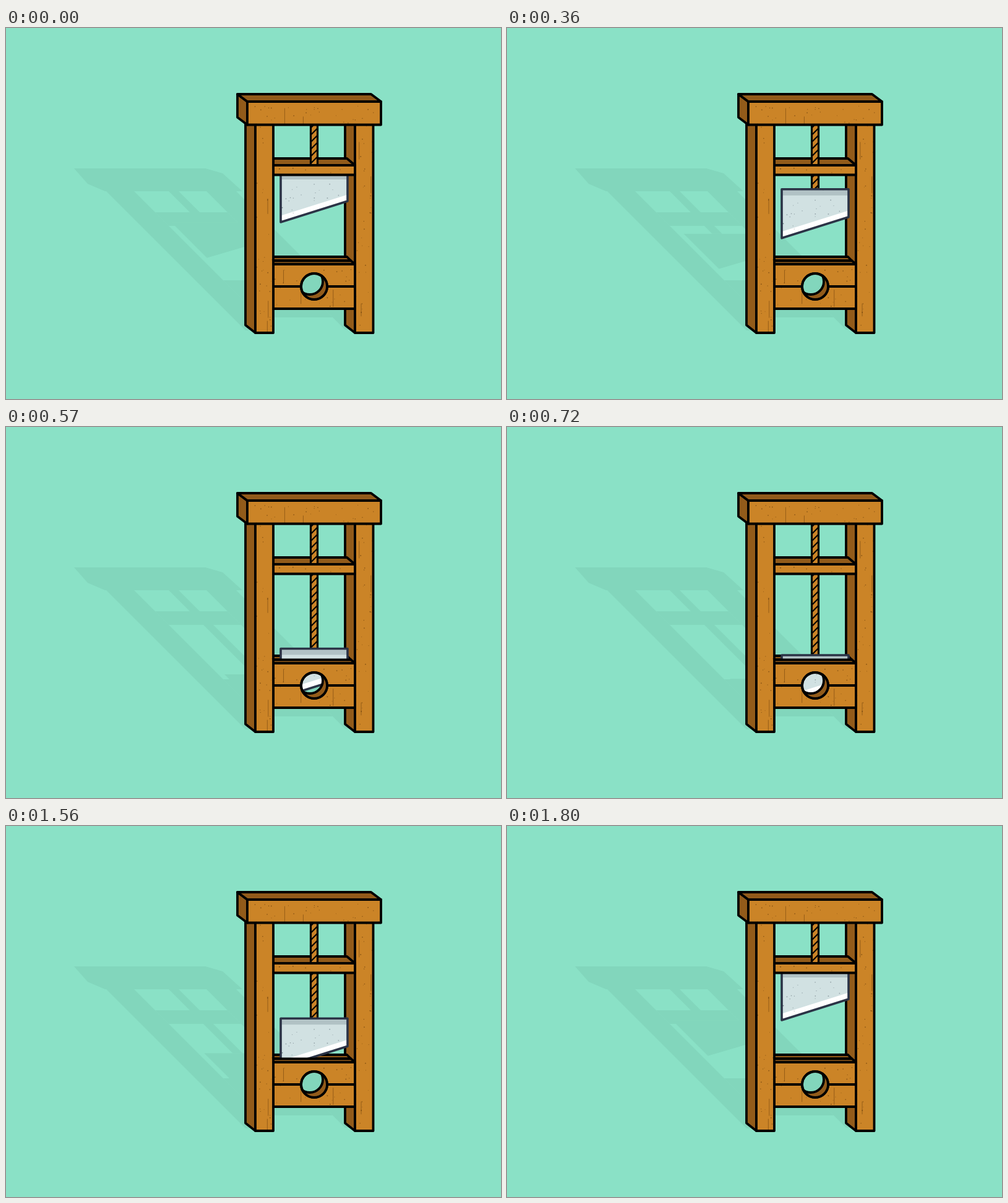
An HTML page with a canvas for the animation above (2730 ms loop, 800x600 px).

```html
<!DOCTYPE html>
<html lang="en">
<head>
<meta charset="utf-8">
<title>Falling blade</title>
<style>
html, body { margin: 0; width: 100%; height: 100%; overflow: hidden; background: #8ae1c6; }
canvas { display: block; }
</style>
</head>
<body>
<canvas id="stage" width="800" height="600"></canvas>
<script>
const ctx = document.getElementById('stage').getContext('2d');
const LOOP = 2730, STEP = 30;
const TOP = 235, DROP = 134;
const BG = '#8ae1c6', SHADE = '#82d6bc', INK = '#000';
const WOOD = '#cb8427', DARK = '#925b1a', GRAIN = 'rgba(70,38,5,.5)';
const STEEL = '#d1e1e2', BAND = '#b1c2c5', EDGE = '#2b3346';
const LINE = 3.8;

let seed;
function rand() {
  seed = (seed * 16807) % 2147483647;
  return seed / 2147483647;
}

// Cubic easing through (x1,y1) and (x2,y2)
function ease(p, x1, y1, x2, y2) {
  if (p <= 0) return 0;
  if (p >= 1) return 1;
  const at = (s, a, b) => 3 * s * (1 - s) * (1 - s) * a + 3 * s * s * (1 - s) * b + s * s * s;
  let lo = 0, hi = 1;
  for (let i = 0; i < 24; i++) {
    const mid = (lo + hi) / 2;
    if (at(mid, x1, x2) < p) lo = mid; else hi = mid;
  }
  return at(lo, y1, y2);
}

function bladeTop(t) {
  const fall = ease((t - 240) / 480, 0.425, 0, 0.25, 1);
  const rise = ease((t - 1350) / 450, 0.17, 0, 0.8, 0.885);
  return TOP + DROP * (fall - rise);
}

function shape(pts) {
  const path = new Path2D();
  for (let i = 0; i < pts.length; i += 2) path.lineTo(pts[i], pts[i + 1]);
  path.closePath();
  return path;
}

function circle(x, y, r) {
  const path = new Path2D();
  path.arc(x, y, r, 0, Math.PI * 2);
  return path;
}

function paint(path, fill, stroke, width = LINE) {
  ctx.fillStyle = fill;
  ctx.fill(path, 'evenodd');
  if (!stroke) return;
  ctx.strokeStyle = stroke;
  ctx.lineWidth = width;
  ctx.stroke(path);
}

function line(x1, y1, x2, y2, width = LINE, color = INK) {
  ctx.strokeStyle = color;
  ctx.lineWidth = width;
  ctx.beginPath();
  ctx.moveTo(x1, y1);
  ctx.lineTo(x2, y2);
  ctx.stroke();
}

function within(path, drawInside) {
  ctx.save();
  ctx.clip(path, 'evenodd');
  drawInside();
  ctx.restore();
}

function specks(x, y, w, h, color) {
  ctx.fillStyle = color;
  for (let n = w * h / 280; n > 0; n--) {
    const size = 0.7 + rand() * 0.9;
    ctx.fillRect(x + rand() * w, y + rand() * h, size, size);
  }
}

function cracks(x, y, w, h) {
  for (let n = Math.floor(w * h / 2500); n > 0; n--) {
    const cx = x + w * rand(), cy = y + h * rand();
    line(cx, cy, cx, cy + 12 + 20 * rand(), 0.8, GRAIN);
  }
}

// Timber with its front face at l,t,r,b and its depth going up and left
function timber(l, t, r, b, dx, dy, hole) {
  paint(shape([l, t, l - dx, t - dy, l - dx, b - dy, l, b]), DARK, INK);
  paint(shape([l, t, l - dx, t - dy, r - dx, t - dy, r, t]), DARK, INK);
  const face = shape([l, t, r, t, r, b, l, b]);
  if (hole) face.addPath(hole);
  paint(face, WOOD);
  within(face, () => {
    specks(l, t, r - l, b - t, GRAIN);
    cracks(l, t, r - l, b - t);
  });
  ctx.strokeStyle = INK;
  ctx.lineWidth = LINE;
  ctx.stroke(face);
}

const bladeShape = (x, y, k = 1) =>
  shape([x, y, x + 108, y, x + 108, y + 45 * k, x, y + 79 * k]);

function drawShadow(top) {
  paint(shape([110, 227, 322, 227, 350, 235, 382, 264, 160, 264, 132, 252]), SHADE);
  const y = 339 + 0.69 * (top - 270);
  const bar = (l, t, r, b) => ctx.fillRect(l, t, r - l, b - t);
  ctx.save();
  ctx.transform(1, 0, 1, 1, 0, 0);
  bar(-102, 262, -57, 489);
  bar(60, 262, 108, 488);
  bar(-57, 298, 60, 320);
  bar(-57, 408, 60, 468);
  bar(-1, 264, 15, y);
  paint(bladeShape(-47, y, 0.72), SHADE);
  ctx.restore();
}

function drawRope(bottom) {
  const rope = shape([492, 150, 504, 150, 504, bottom, 492, bottom]);
  paint(rope, WOOD);
  within(rope, () => {
    for (let y = 156; y < bottom + 6; y += 11.5) line(492, y + 6, 504, y - 6, 2.2);
  });
  for (const x of [492.5, 503.5]) line(x, 150, x, bottom, 3.2);
}

function drawBlade(y) {
  const blade = bladeShape(444, y);
  paint(blade, '#fff');
  within(blade, () => {
    paint(bladeShape(444, y - 10.5), STEEL);
    ctx.fillStyle = BAND;
    ctx.fillRect(444, y, 108, 10);
    specks(444, y, 108, 70, 'rgba(70,85,95,.5)');
  });
  ctx.strokeStyle = EDGE;
  ctx.lineWidth = 3.6;
  ctx.stroke(blade);
}

function drawStock() {
  const hole = circle(498, 418, 21);
  timber(432, 382, 564, 454, 6.5, 5.5, hole);
  line(432, 418, 477, 418);
  line(519, 418, 564, 418);

  // Inner wall of the hole
  within(hole, () => {
    const wall = circle(491, 410, 21);
    wall.rect(470, 380, 60, 70);
    paint(wall, DARK, INK);
  });
  ctx.stroke(hole);
}

function draw(t) {
  const y = bladeTop(t);
  seed = 11;
  ctx.lineJoin = 'round';
  ctx.fillStyle = BG;
  ctx.fillRect(0, 0, 800, 600);
  drawShadow(y);

  timber(564, 150, 593.5, 493, 16, 12.5);
  timber(425.5, 376.5, 557.5, 382, 6.5, 6.5);
  paint(shape([432, 222, 432, 211, 551, 211, 564, 222]), DARK, INK);
  drawRope(y);
  drawBlade(y);
  drawStock();
  timber(432, 222, 564, 237.5, 0, 0);
  timber(403, 150, 432, 493, 16, 12.5);
  timber(390, 119, 606, 156.5, 16, 12);
}

const start = performance.now();
function tick() {
  const t = (performance.now() - start) % LOOP;
  draw(Math.floor(t / STEP) * STEP);
  requestAnimationFrame(tick);
}
tick();
</script>
</body>
</html>
```
